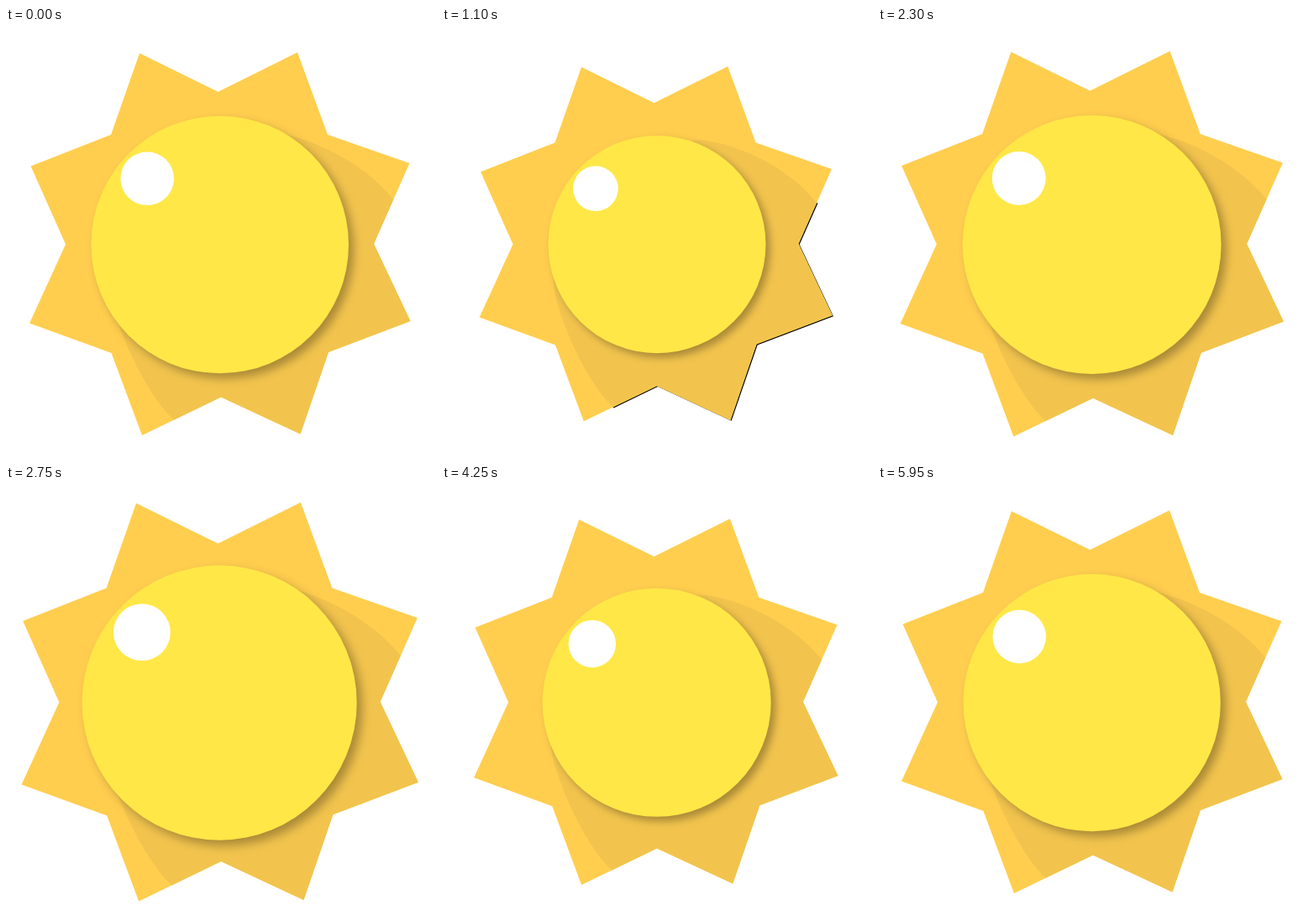
An HTML page for the animation above (6000 ms loop, 512 px wide and 512 px high).

```html
<!DOCTYPE html>
<html lang="en">
<head>
<meta charset="utf-8">
<title>Pulsing sun</title>
<style>
  html, body { margin: 0; width: 100%; height: 100%; overflow: hidden; background: #fff; }
  svg { display: block; width: 100vw; height: 100vh; }
</style>
</head>
<body>
<svg viewBox="0 0 512 512">
  <defs>
    <path id="star" d="M159 30 252.500 76 347 29 383 127 480.500 161 438 257 481.500 349 384 386
      350.500 483.500 256 439.500 162 485 125.500 387 28 351.500 71 257.500 29.500 164.500 125 127Z"/>
    <path id="shade" d="M123 303C122 335 160 428 199 466V520H520V204H461C420 152 340 121 303 124Z"/>
    <clipPath id="inStar"><use href="#star"/></clipPath>
    <filter id="drop" x="-20%" y="-20%" width="140%" height="140%" color-interpolation-filters="sRGB">
      <feDropShadow dx="6" dy="6" stdDeviation="5.500" flood-color="#000" flood-opacity=".3"/>
    </filter>
  </defs>
  <g id="rays">
    <g id="fringe"><use href="#shade" clip-path="url(#inStar)"/></g>
    <use href="#star" fill="#ffce4f"/>
    <use href="#shade" fill="#f2c44e" clip-path="url(#inStar)"/>
  </g>
  <g id="disc">
    <circle r="153.300" fill="#ffe747" filter="url(#drop)"/>
    <circle cx="-86.500" cy="-78.700" r="31.800" fill="#fff"/>
  </g>
</svg>
<script>
const LOOP = 6000, STEP = 50;

// [time in ms, size in px]
const rayKeys = [[0, 453], [650, 437], [1150, 419.5], [1900, 440], [2650, 469], [3280, 480.5],
  [3550, 474], [3900, 455], [4620, 419], [5125, 429], [5850, 452], [6000, 453]];
const discKeys = [[0, 153.3], [1180, 129.2], [1850, 138.8], [2730, 163.6],
  [3550, 150.3], [4860, 129], [6000, 153.3]];

// Slope at a key: flat at the ends and at turning points
function slope(keys, i) {
  const a = keys[i - 1], b = keys[i], c = keys[i + 1];
  if (!a || !c || (b[1] - a[1]) * (c[1] - b[1]) <= 0) return 0;
  return (c[1] - a[1]) / (c[0] - a[0]);
}

// Smooth curve through the keys
function sample(keys, t) {
  const i = keys.findIndex(k => k[0] > t) - 1;
  const [t0, v0] = keys[i], [t1, v1] = keys[i + 1];
  const d = t1 - t0, u = (t - t0) / d, w = 1 - u;
  return v0 * w * w * (1 + 2 * u) + v1 * u * u * (3 - 2 * u)
    + d * u * w * (slope(keys, i) * w - slope(keys, i + 1) * u);
}

const el = id => document.getElementById(id);
const rays = el('rays'), disc = el('disc'), fringe = el('fringe');
const start = performance.now();

function draw() {
  const elapsed = Math.max(0, performance.now() - start) % LOOP;
  const t = Math.floor(elapsed / STEP) * STEP;
  const r = sample(rayKeys, t) / 453;
  const s = sample(discKeys, t) / 153.3;
  // Dark rim that shows only while the rays are small
  const rim = Math.min(1.2, Math.max(0, (0.95 - r) * 50));
  rays.setAttribute('transform', `translate(255 257) scale(${r}) translate(-255 -257)`);
  fringe.setAttribute('transform', `translate(${rim} ${rim * 0.8})`);
  fringe.setAttribute('visibility', rim ? 'visible' : 'hidden');
  disc.setAttribute('transform', `translate(${263 - 8.3 * s} ${256 + 2 * s}) scale(${s})`);
  requestAnimationFrame(draw);
}
draw();
</script>
</body>
</html>
```
